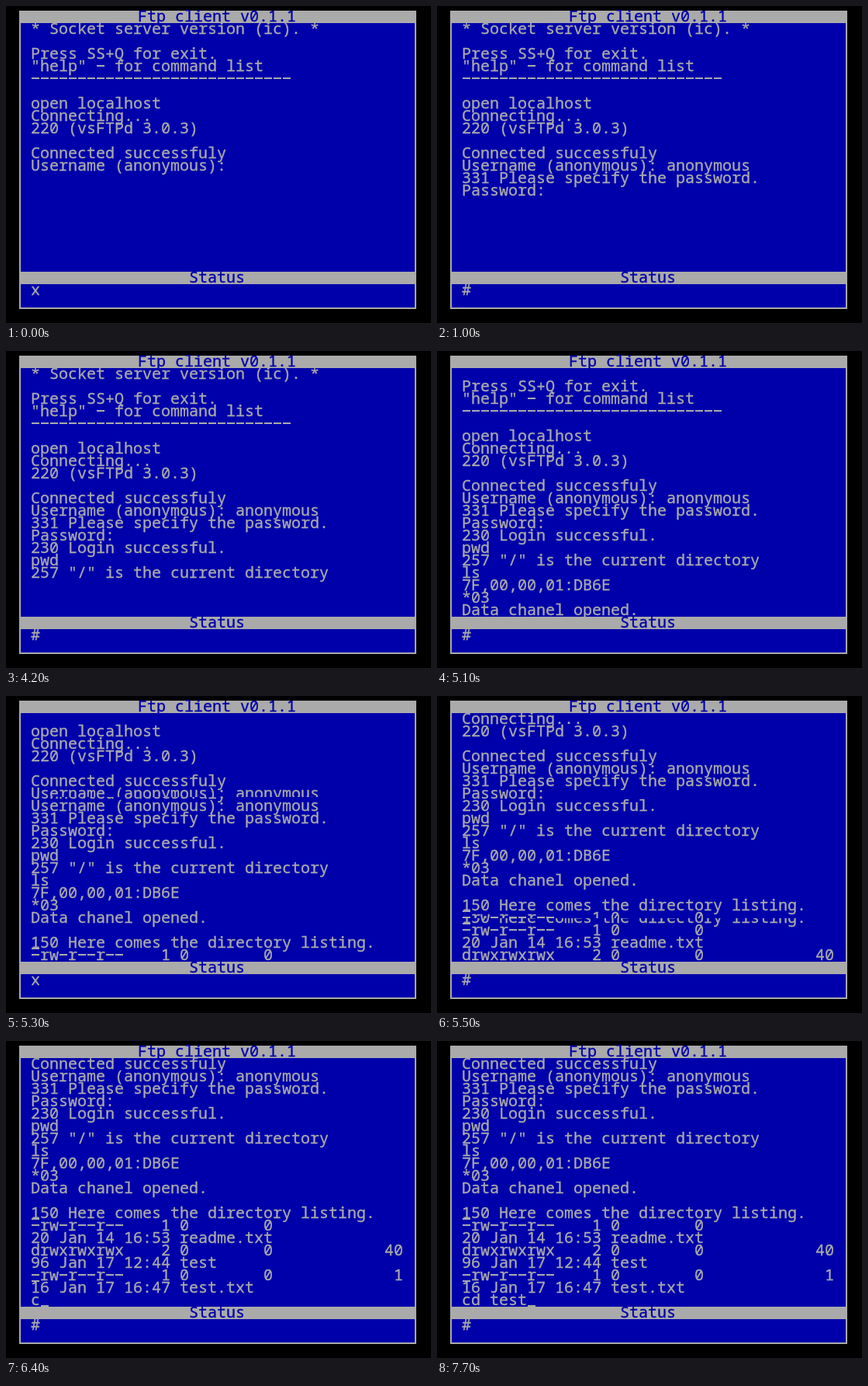
An HTML page with a canvas that plays this animation: 548 px wide and 408 px high, repeating every 8000 ms.

```html
<!DOCTYPE html>
<html lang="en">
<head>
<meta charset="utf-8">
<title>Ftp client</title>
<style>
  html, body { margin: 0; width: 100%; height: 100%; overflow: hidden; background: #000; }
  canvas { display: block; }
</style>
</head>
<body>
<canvas id="stage" width="548" height="408"></canvas>
<script>
const LOOP = 8000, CELL = 12, ROW = 16, ROWS = 20, LEFT = 32, TOP = 22;
const BLUE = '#0000aa', GRAY = '#aaaaaa';
const ctx = document.getElementById('stage').getContext('2d');

// "_" is the cursor; "_\b" leaves a cursor trace under the next character.
const LOG = [
  '* Socket server version (ic). *',
  '',
  'Press SS+Q for exit.',
  '"help" - for command list',
  '-'.repeat(28),
  '',
  'open localhost',
  'Connecting...',
  '220 (vsFTPd 3.0.3)',
  '',
  'Connected successfuly',
  'Username (anonymous):',
  '', '', '', '', '', '', '', '',
  'Data chanel opened.',
  '',
  '_\b150 Here comes the directory listing.',
  '-rw-r--r--    1 0        0',
  '20 Jan 14 16:53 readme.txt',
  'drwxrwxrwx    2 0        0            40',
  '96 Jan 17 12:44 test',
  '_\b-rw-r--r--    1 0        0             1',
  '16 Jan 17 16:47 test.txt',
  ''
];

// [time in ms, line, new text]
const EVENTS = [
  [100, 11, 'Username (anonymous): _'],
  [300, 11, 'Username (anonymous): anonymous'],
  [400, 12, '331 Please specify the password.'],
  [500, 13, 'Password: _'], [700, 13, 'Password:'],
  [900, 13, 'Password: _'], [1000, 13, 'Password:'],
  [1300, 14, '230 Login successful.'],
  [1300, 15, '_'], [1600, 15, ''], [1800, 15, '_'], [2000, 15, ''],
  [2300, 15, '_'], [3100, 15, ''], [3300, 15, '_'], [3500, 15, ''],
  [3700, 15, 'p_'], [3800, 15, 'pw_'], [3900, 15, 'pwd_'], [4100, 15, 'pwd'],
  [4200, 16, '257 "/" is the current directory'],
  [4300, 17, '_'], [4500, 17, ''], [4700, 17, 'l_'], [4800, 17, 'ls'],
  [5000, 18, '7F,00,00,01:DB6E'], [5000, 19, '*03'],
  [5800, 29, '_'], [6100, 29, ''], [6300, 29, '_'], [6400, 29, 'c_'],
  [6600, 29, 'cd_'], [6700, 29, 'cd _'], [6900, 29, 'cd'], [7200, 29, 'cd _'],
  [7400, 29, 'cd t_'], [7500, 29, 'cd te_'], [7700, 29, 'cd test_']
];

function print(text, x, y, color = GRAY) {
  ctx.fillStyle = ctx.strokeStyle = color;
  for (const ch of text) {
    if (ch === '\b') { x -= CELL; continue; }
    if (ch === '-') ctx.fillRect(x + 1, y + 6, 10, 2);
    else if (ch === '_') ctx.fillRect(x + 1, y + 14, 10, 2);
    else {
      ctx.fillText(ch, x, y + 14);
      ctx.strokeText(ch, x, y + 14);
    }
    x += CELL;
  }
}

function bar(title, x, y) {
  ctx.fillStyle = GRAY;
  ctx.fillRect(17, y, 512, ROW);
  print(title, x, y, BLUE);
}

function printLog(lines, scroll, from, to) {
  ctx.save();
  ctx.beginPath();
  ctx.rect(19, from, 508, to - from);
  ctx.clip();
  lines.slice(scroll, scroll + ROWS).forEach((line, i) => print(line, LEFT, TOP + i * ROW));
  ctx.restore();
}

function scrollAt(t) {
  if (t < 5100) return 0;
  if (t < 5200) return 1;
  return Math.min(10, 6.825 + (t - 5500) * 0.01243);
}

function draw(t) {
  const lines = LOG.slice();
  for (const [time, line, text] of EVENTS) if (time <= t) lines[line] = text;

  ctx.fillStyle = '#000';
  ctx.fillRect(0, 0, 548, 408);
  ctx.fillStyle = GRAY;
  ctx.fillRect(17, 6, 512, 384);
  ctx.fillStyle = BLUE;
  ctx.fillRect(19, 8, 508, 380);

  // Scrolling copies pixel rows from the top, so the view can be split mid-copy.
  const scroll = scrollAt(t), whole = Math.floor(scroll);
  const split = TOP + 2 * Math.round((scroll - whole) * ROWS * ROW / 2);
  printLog(lines, whole + 1, TOP, split);
  printLog(lines, whole, split, TOP + ROWS * ROW);

  bar('Ftp client v0.1.1', 170, 6);
  bar('Status', 236, 342);
  print(t < 400 || t === 5300 ? 'x' : '#', LEFT, 358);
}

function tick(now) {
  ctx.font = '20px "Noto Sans Mono", monospace';
  ctx.lineWidth = 0.35;
  ctx.lineJoin = 'round';
  draw(Math.floor(now % LOOP / 100) * 100);
  requestAnimationFrame(tick);
}
tick(performance.now());
</script>
</body>
</html>
```
